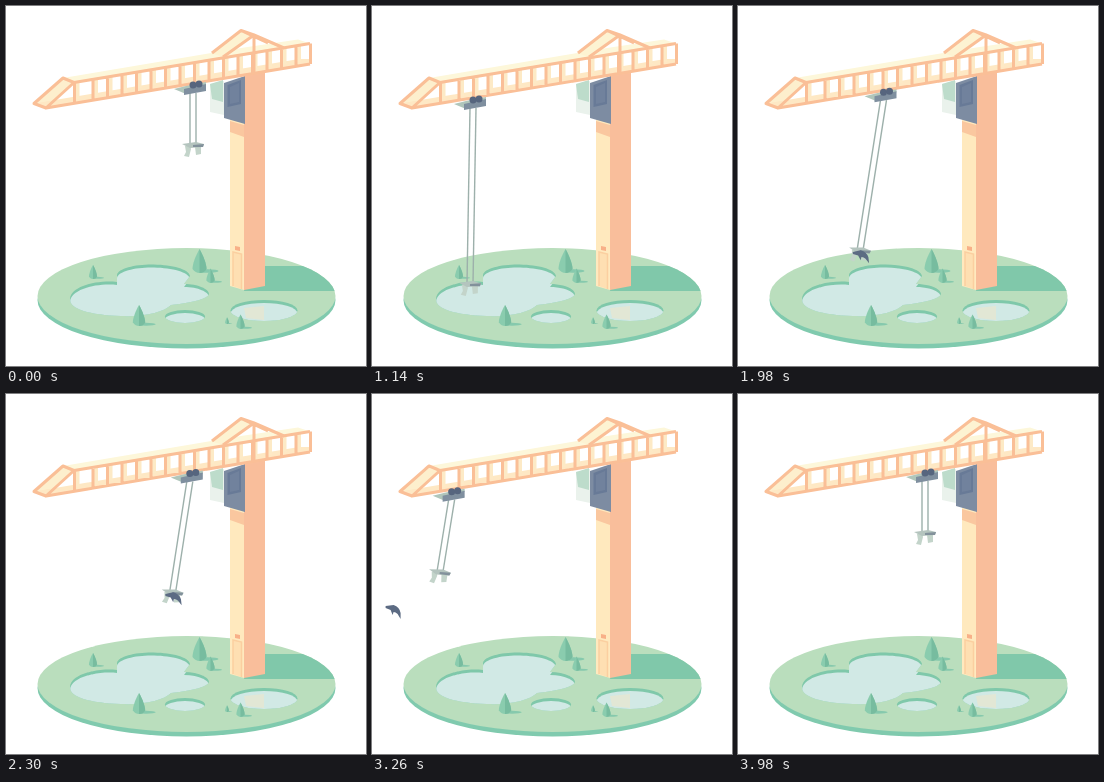
An HTML page for the animation above (4680 ms loop, 360 by 360 pixels).

```html
<!DOCTYPE html>
<html lang="en">
<head>
<meta charset="utf-8">
<title>Crane</title>
<style>
html, body { margin: 0; height: 100%; overflow: hidden; background: #fff; }
svg { display: block; width: 100vw; height: 100vh; }
.line { fill: none; stroke: #fabf97; stroke-width: 3; stroke-linejoin: round; }
.pale { fill: none; stroke: #fdeac6; stroke-width: 4; }
</style>
</head>
<body>
<svg viewBox="0 0 360 360">
  <defs>
    <clipPath id="land"><ellipse cx="180.5" cy="290" rx="149" ry="48"/></clipPath>
    <g id="tree">
      <ellipse cx="8" cy="-2" rx="11" ry="1.7" fill="#86c9ad"/>
      <path d="M0-24C-4-17-7-9-7-4Q-4 0 0 0Q5 0 7-4C7-9 4-17 0-24" fill="#8accae"/>
      <path d="M0-24L0 0Q5 0 7-4C7-9 4-17 0-24" fill="#77bc9f"/>
    </g>
  </defs>

  <ellipse cx="180.5" cy="294" rx="149" ry="48.5" fill="#80caae"/>
  <ellipse cx="180.5" cy="290" rx="149" ry="48" fill="#badebd"/>
  <path d="M245 260H340V285H238Z" fill="#80c8aa" clip-path="url(#land)"/>
  <g id="ponds"></g>
  <path d="M238 302L258 300V314L240 312Z" fill="#e9e6cf" opacity=".7"/>
  <g id="trees"></g>

  <path d="M224 110L238 116V284L224 280Z" fill="#ffe9be"/>
  <path d="M238 69L259 64V280L238 284Z" fill="#f9be9b"/>
  <path d="M224 115L238 119V131L224 126Z" fill="#fac79f"/>
  <path d="M227 280V246L235.500 248V283" fill="#fedfb2" stroke="#fbcfa0" stroke-width="1.500"/>
  <path d="M229 240L234 241V245L229 244Z" fill="#f8b088"/>

  <path d="M204 78L218 75V109L204 106Z" fill="#eaf2ec"/>
  <path d="M204 78L217 74V96L206 93Z" fill="#bddccb"/>
  <path d="M218 77L239 70V118L218 112Z" fill="#7d8ca2"/>
  <path d="M221.500 79L235 74V98L221.500 101Z" fill="#687a97"/>
  <path d="M224 81L233 77V96L224 98Z" fill="#71829d"/>

  <g id="boom"></g>

  <g id="cables" stroke="#9db0ab" stroke-width="1.400"><line/><line/></g>
  <g id="trolley">
    <path d="M-22 2L-10-1L10-5V-2L-10 7Z" fill="#b0c6bb"/>
    <path d="M-12 2L10-3V4L-12 8Z" fill="#7f8f9f"/>
    <circle cx="-3" cy="-2" r="3.500" fill="#56657e"/>
    <circle cx="3" cy="-3" r="3.500" fill="#56657e"/>
  </g>
  <g id="grab">
    <path d="M-8 3L-3 2L-2 6L-4 14L-9 13L-7 9Z" fill="#c3d4ca"/>
    <path d="M2 4L8 2V11L3 12Z" fill="#c3d4ca"/>
    <path d="M-11 1L3-1L11 1L10 4L-3 5Z" fill="#b4c4be"/>
    <path d="M0 2L11 1L10 4L0 4Z" fill="#82919b"/>
  </g>
  <path id="fish" d="M-8-5L0-6Q6-4 7 2V8L4 3Q2 1 0 1L-1 4L-3-1L-8-3Z" fill="#5c6b83"/>
</svg>
<script>
const $ = id => document.getElementById(id);
const path = (d, attrs) => `<path d="${d}" ${attrs}/>`;

// Each pond is a dark rim with the water surface set lower inside it.
const pond = (d, i) => `<clipPath id="pond${i}">${path(d, '')}</clipPath>` +
  path(d, 'fill="#7fc8aa"') +
  `<g clip-path="url(#pond${i})">${path(d, 'fill="#d1e9e5" transform="translate(0 3)"')}</g>`;
const oval = (x, y, rx, ry) => `M${x - rx} ${y}a${rx} ${ry} 0 0 1 ${2 * rx} 0a${rx} ${ry} 0 0 1 ${-2 * rx} 0Z`;
$('ponds').innerHTML = [
  'M64 293C65 280 91 274 111 276V269C112 262 131 258 148 258.500C166 259 183 263 184 270L178 278C192 278 203 283 203 288Q201 295 165 299C158 306 139 311 115 310C84 309 63 303 64 293Z',
  oval(179, 310.5, 20, 6.5),
  oval(258, 304.5, 33.5, 10.5)
].map(pond).join('');

const tree = (x, y, size) => `<use href="#tree" transform="translate(${x} ${y}) scale(${size})"/>`;
$('trees').innerHTML = tree(87, 273, .58) + tree(193.5, 267, 1) + tree(204.5, 277, .6) +
  tree(133, 320, .88) + tree(221, 318, .28) + tree(234.5, 323, .6);

// The far side of the boom is the near side shifted up and to the left.
function buildBoom() {
  const top = x => 76.5 - (x - 68) * .165;
  const bottom = x => 102 - (x - 40) * .1667;
  let posts = '', farPosts = '';
  for (let i = 0; i <= 16; i++) {
    const x = i ? 72.5 + 14.5 * i : 68.5;
    posts += `M${x} ${top(x)}V${bottom(x)}`;
    if (i < 16) farPosts += `M${x + 3} ${top(x)}V${bottom(x) - 5}`;
  }
  return path('M57 72L235 42L292 33.500L304 37.500L68 77Z', 'fill="#fdf7da"') +
    path('M28 97.500L57 72L68 77L40 102Z', 'fill="#fdefcd"') +
    path('M205 47L235 24L248 29L217 51Z', 'fill="#fdf3d2"') +
    path('M28 97.500L293 53H304V58L40 102Z', 'fill="#fee8c4"') +
    path(farPosts, 'class="pale"') +
    path(`M304 58L40 102L68 ${top(68)}L304 ${top(304)}` + posts, 'class="line"') +
    path('M40 102L28 97.500L57 72L68 76.500', 'class="line"') +
    path('M206 47L235 24.500L248 29L217 51M248 29V66M248 29L278 42M235 24.500L262 37', 'class="line"');
}
$('boom').innerHTML = buildBoom();

const LOOP = 4680, STEP = 40, CATCH = 1450, RELEASE = 3060;
const progress = (t, from, to) => Math.min(1, Math.max(0, (t - from) / (to - from)));
const ease = (t, from, to) => {
  const u = progress(t, from, to);
  return u * u * (3 - 2 * u);
};
const sway = (t, from, to) => Math.sin(Math.PI * progress(t, from, to));

// Out to the pond, back with the catch, then a run-up to throw it away.
const trolleyX = t => 190 - 86 * ease(t, 260, 980) + 86 * ease(t, 1540, 2400)
  - 124 * ease(t, 2500, RELEASE) + 124 * ease(t, RELEASE, 3930);
const grabY = t => 137 + 139 * (ease(t, 260, 1030) - ease(t, 1530, 2930))
  + 39 * (ease(t, 2600, RELEASE) - ease(t, 3300, 3860));
const grabSwing = t => 6 * sway(t, 260, 900) - 3 * sway(t, 900, 1400) - 25 * sway(t, 1660, 2500)
  + 20 * sway(t, 2500, 2860) - 29 * sway(t, 2860, 3320) + 6 * sway(t, 3320, 3900);

function place(id, x, y, angle = 0) {
  $(id).setAttribute('transform', `translate(${x} ${y}) rotate(${angle})`);
}

function draw(now) {
  const t = Math.floor((now % LOOP - 20) / STEP) * STEP + 20;
  const x = trolleyX(t), y = grabY(t), swing = grabSwing(t);
  const railY = 81 - (x - 190) * .174;
  const hookX = x - 3 + swing;
  const tilt = -Math.atan2(swing, y - railY) * 180 / Math.PI;

  place('trolley', x, railY);
  place('grab', hookX, y, tilt);
  [...$('cables').children].forEach((cable, i) => {
    const side = i * 6 - 3;
    cable.setAttribute('x1', x - 3 + side);
    cable.setAttribute('y1', railY + 6);
    cable.setAttribute('x2', hookX + side);
    cable.setAttribute('y2', y + 1);
  });

  const s = (t - RELEASE) / 1000;
  if (s < 0) place('fish', hookX + 1, y + 8, tilt - 15);
  else place('fish', hookXAtRelease - 65 * s, grabY(RELEASE) + 8 + 105 * s + 300 * s * s, 20 - 100 * s);
  $('fish').style.display = t >= CATCH && s < .64 ? '' : 'none';
}

const hookXAtRelease = trolleyX(RELEASE) - 3 + grabSwing(RELEASE);
const start = performance.now();
function frame() {
  draw(performance.now() - start);
  requestAnimationFrame(frame);
}
frame();
</script>
</body>
</html>
```
